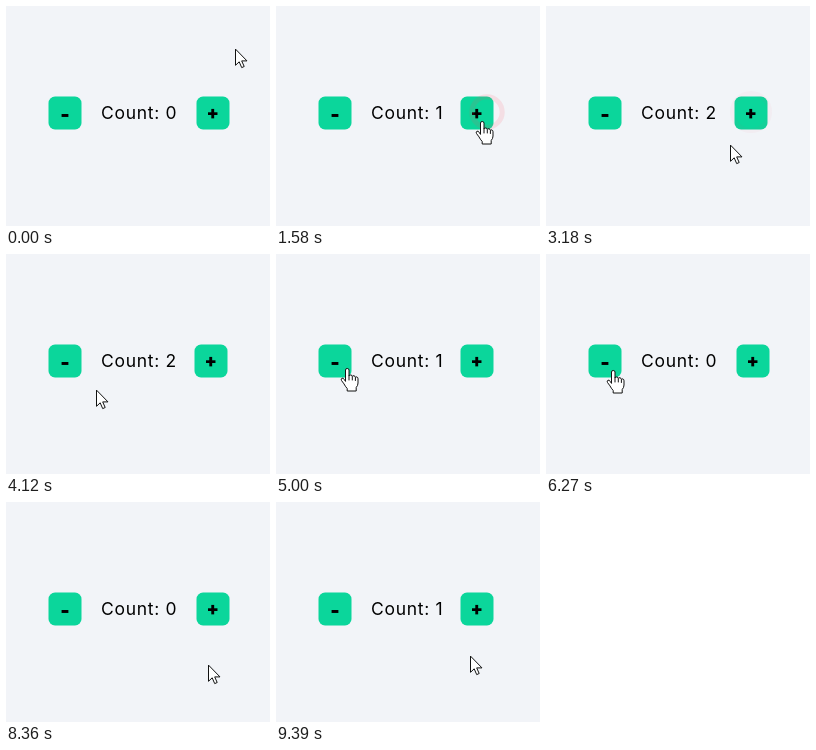
Write an HTML page that moves like this. It is 264x220 px and loops after 9420 ms.

```html
<!DOCTYPE html>
<html lang="en">
<head>
<meta charset="utf-8">
<title>Counter</title>
<style>
  html, body { margin: 0; width: 100%; height: 100%; overflow: hidden; background: #f2f4f8; }
  svg { display: block; width: 264px; height: 220px; }
  text { font-family: Inter, sans-serif; }
  .label { font-size: 17.5px; letter-spacing: .04em; white-space: pre; }
  .sign { font-size: 18px; font-weight: 900; text-anchor: middle; }
  .button { fill: #0bd69b; }
  .cursor { fill: #fff; stroke: #111; stroke-width: 1; stroke-linejoin: round; stroke-linecap: round; }
</style>
</head>
<body>
<svg viewBox="0 0 264 220">
  <g transform="translate(43 91)">
    <rect class="button" x="-.5" y="-.5" width="33" height="33" rx="6.5"/>
    <text class="sign" x="16" y="24" style="font-size:20px">-</text>
  </g>
  <text class="label" id="label" x="95" y="113">Count: 0</text>
  <g id="plus">
    <rect class="button" x="-.5" y="-.5" width="33" height="33" rx="6.5"/>
    <text class="sign" x="15.7" y="21.5">+</text>
  </g>
  <circle id="ring" fill="none" stroke="#ff4650" stroke-width="5"/>
  <path class="cursor" id="arrow" d="M-.5 .5V16.3L3.2 12.8 5.7 18.6 8.2 17.5 5.7 11.9H10.6Z"/>
  <g class="cursor" id="hand">
    <path d="M-.5 13V2Q-.5 .5 1.2 .5T3 2V8Q3.2 6.8 4.8 7T6.3 8.5Q6.6 7.5 8 7.8T9.4 9.5Q9.9 8.5 11 9T12 10.8V15Q12 17.5 10.2 19.5V23H1.2V20.5Q-.8 18.3-2 15.9L-4.5 12.5Q-5.4 10.8-4 10.2T-1.7 11.5Z"/>
    <path d="M3 8V12M6.3 9V12M9.4 10V12.5" fill="none"/>
  </g>
</svg>
<script>
const LOOP = 9420, RING_TIME = 430;
const TOP = 91, SIZE = 32, MINUS_X = 43;
const $ = id => document.getElementById(id);
const move = (el, x, y) => el.setAttribute("transform", `translate(${x} ${y})`);

// the button follows the width of the digit
const plusX = count => [191, 185, 189][count];

// the pointer eases from stop to stop; "+" and "-" are clicks on a button
const stops = [
  [300, 230, 43], [1280, "+"], [2100, 192, 134], [2790, "+"],
  [3200, 185, 139], [3850, 110, 155], [4480, "-"], [5000, 70, 114],
  [5350, 74, 154], [5660, "-"], [6200, 67, 118], [6470, "-"],
  [7250, 67, 147], [8300, 203, 165], [8800, "+"], [9390, 195, 154]
];

let total = 0;
const route = stops.map(([time, x, y]) => {
  if (x !== "+" && x !== "-") return { time, x, y, count: total };
  const left = x === "+" ? plusX(total) : MINUS_X;
  total = Math.max(0, total + (x === "+" ? 1 : -1));
  return { time, x: left + SIZE / 2 + 4, y: TOP + SIZE / 2, count: total, click: true };
});

function pointer(t) {
  const next = route.findIndex(p => p.time > t);
  if (next === 0) return route[0];
  if (next < 0) return route[route.length - 1];
  const a = route[next - 1], b = route[next];
  const s = (t - a.time) / (b.time - a.time), e = s * s * (3 - 2 * s);
  return {
    x: Math.round(a.x + (b.x - a.x) * e),
    y: Math.round(a.y + (b.y - a.y) * e),
    count: a.count
  };
}

function draw(t) {
  const { x, y, count } = pointer(t);
  const over = left => x >= left && x < left + SIZE && y >= TOP && y < TOP + SIZE;
  const hover = over(MINUS_X) || over(plusX(count));

  $("label").textContent = "Count: " + count;
  move($("plus"), plusX(count), TOP);
  for (const id of ["arrow", "hand"]) {
    move($(id), x, y);
    $(id).style.display = (id === "hand") === hover ? "" : "none";
  }

  const click = route.find(p => p.click && t >= p.time && t < p.time + RING_TIME);
  const ring = $("ring");
  ring.style.display = click ? "" : "none";
  if (click) {
    const p = (t - click.time) / RING_TIME;
    ring.setAttribute("cx", click.x);
    ring.setAttribute("cy", click.y - 1);
    ring.setAttribute("r", 4 + 16 * p);
    ring.style.opacity = 0.4 * (1 - p);
  }
}

const start = performance.now();
function tick() {
  draw((performance.now() - start) % LOOP);
  requestAnimationFrame(tick);
}
tick();
</script>
</body>
</html>
```
